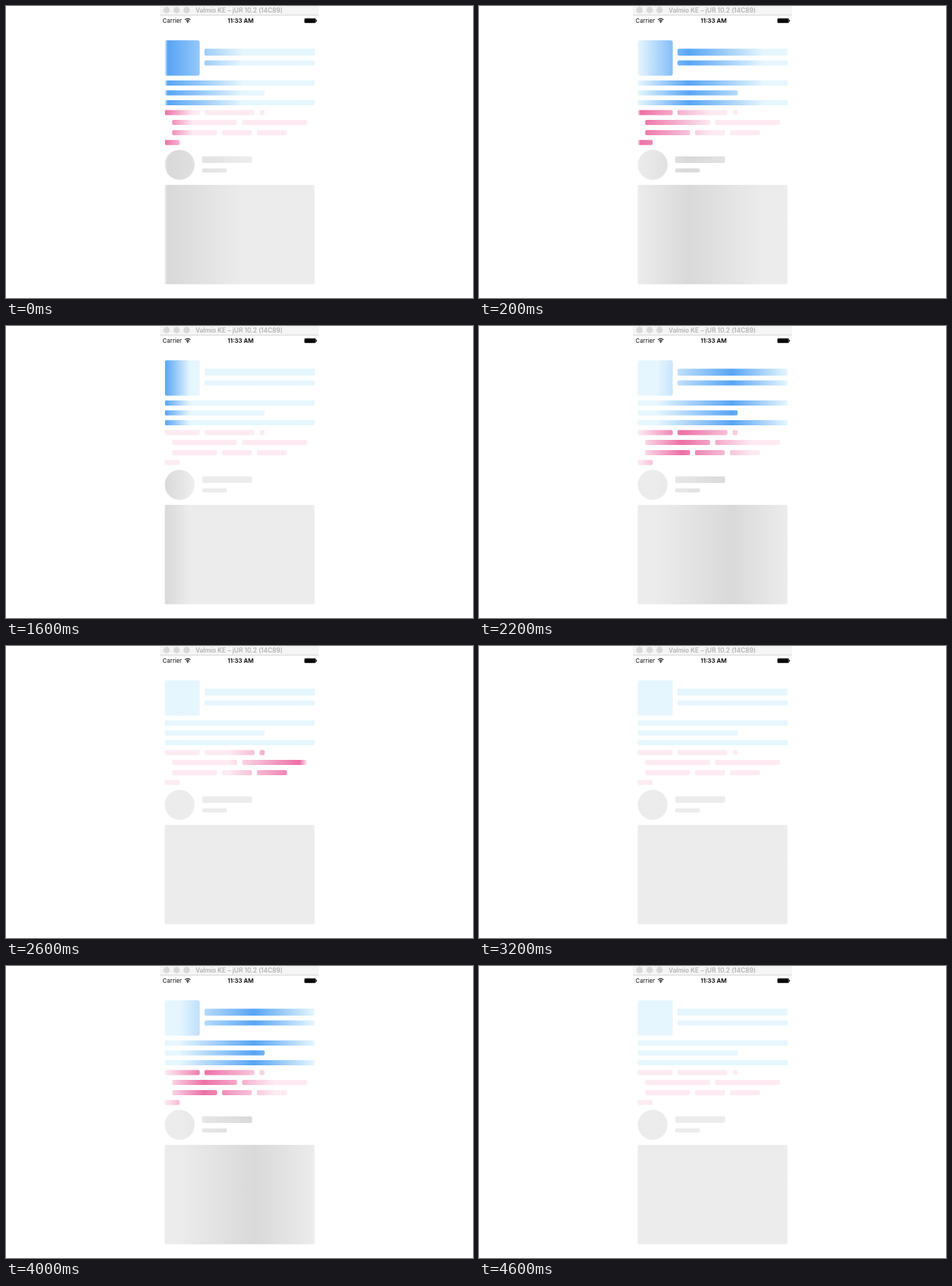
Write an HTML page that moves like this. It is 640 by 400 pixels and loops after 4800 ms.

```html
<!DOCTYPE html>
<html lang="en">
<head>
<meta charset="utf-8">
<title>Skeleton loading</title>
<style>
  html, body { margin: 0; width: 100%; height: 100%; overflow: hidden; background: #fff; }
  svg { display: block; width: 640px; height: 400px; }
  text { font-family: Inter, "Liberation Sans", sans-serif; }
</style>
</head>
<body>
<svg id="stage" viewBox="0 0 640 400">
  <defs id="defs"></defs>

  <rect x="211" y="0" width="218" height="12.5" fill="whitesmoke"/>
  <rect x="211" y="12" width="218" height="1" fill="#d6d6d6"/>
  <g fill="#d8d8d8">
    <circle cx="220" cy="5.5" r="4.4"/>
    <circle cx="233.8" cy="5.5" r="4.4"/>
    <circle cx="247.5" cy="5.5" r="4.4"/>
  </g>
  <text x="319.5" y="9" text-anchor="middle" font-size="8.7" font-weight="500" fill="#a9a9a9">Valmio KE – jUR 10.2 (14C89)</text>

  <text x="214.5" y="23" font-size="8.1" fill="#111">Carrier</text>
  <g fill="none" stroke="#111" stroke-width="1.2">
    <path d="M245.2 18.9a5.4 5.4 0 0 1 7.6 0"/>
    <path d="M246.8 20.6a3.2 3.2 0 0 1 4.4 0"/>
  </g>
  <path d="M249 23.2l-1.4 -1.5a2 2 0 0 1 2.8 0z" fill="#111"/>
  <text x="321.5" y="23" text-anchor="middle" font-size="8.2" font-weight="600" fill="#000">11:33 AM</text>
  <rect x="409" y="17" width="15.6" height="6.2" rx="1.2" fill="#000"/>
  <rect x="425" y="18.8" width="1" height="2.6" rx=".5" fill="#000"/>
</svg>

<script>
const LOOP = 4800, STEP = 200;
const CYCLE = 1820;    // ms between two sweeps
const SPEED = 0.0016;  // group widths per ms
const LEAD = 420;      // ms of the cycle that lie before phase zero
const EXIT = 1.1;      // the highlight vanishes past this point

// Bars: [x, y, width, height, radius]
const groups = [
  { id: "blue", left: 217.5, right: 423, base: "#e6f6fe", shine: "#58a5f4", delay: 0, bars: [
    [217.5, 47, 48, 48.5, 3],
    [272, 58.5, 151, 9.5], [272, 74.5, 151, 7],
    [217.5, 102, 205.5, 7], [217.5, 115.5, 137, 7], [217.5, 129, 205.5, 7]] },
  { id: "pink", left: 217.5, right: 412.5, base: "#fdebf3", shine: "#ed70a6", delay: 200, bars: [
    [217.5, 142.5, 48, 7], [272, 142.5, 68.5, 7], [347.5, 142.5, 7, 7],
    [227.7, 156, 89, 7], [323.5, 156, 89, 7],
    [227.7, 170, 61.7, 7], [296, 170, 41, 7], [344, 170, 41, 7],
    [217.5, 183.5, 20.5, 7]] },
  { id: "gray", left: 217.5, right: 423, base: "#ececec", shine: "#d9d9d9", delay: 0, bars: [
    [217.5, 197, 41, 41, 20.5],
    [268.8, 206, 68.5, 9], [268.8, 222.5, 34, 5.5],
    [217.5, 245, 205.3, 136.3]] }
];

const stage = document.getElementById("stage");
const defs = document.getElementById("defs");

function add(parent, tag, attrs) {
  const el = document.createElementNS(stage.namespaceURI, tag);
  for (const key in attrs) el.setAttribute(key, attrs[key]);
  return parent.appendChild(el);
}

for (const g of groups) {
  const gradient = add(defs, "linearGradient", {
    id: g.id, gradientUnits: "userSpaceOnUse", x1: g.left, x2: g.right, y1: 0, y2: 0
  });
  g.stops = [g.base, g.shine, g.base].map(color =>
    add(gradient, "stop", { offset: 0, "stop-color": color }));
  const layer = add(stage, "g", { fill: `url(#${g.id})` });
  for (const [x, y, width, height, rx = 2] of g.bars)
    add(layer, "rect", { x, y, width, height, rx });
}

const clamp = v => Math.min(1, Math.max(0, v));

// Position of the highlight's peak, as a fraction of the group's width
function peakAt(time) {
  const phase = (time + LEAD + CYCLE) % CYCLE - LEAD;
  const peak = 0.02 + phase * SPEED;
  return peak > EXIT ? -1 : peak;
}

function draw(now) {
  const time = Math.floor(now % LOOP / STEP) * STEP;
  for (const g of groups) {
    const peak = peakAt(time - g.delay);
    g.stops.forEach((stop, i) =>
      stop.setAttribute("offset", clamp(peak + (i - 1) / 2)));
  }
}

const start = performance.now();
function tick() {
  draw(performance.now() - start);
  requestAnimationFrame(tick);
}
tick();
</script>
</body>
</html>
```
